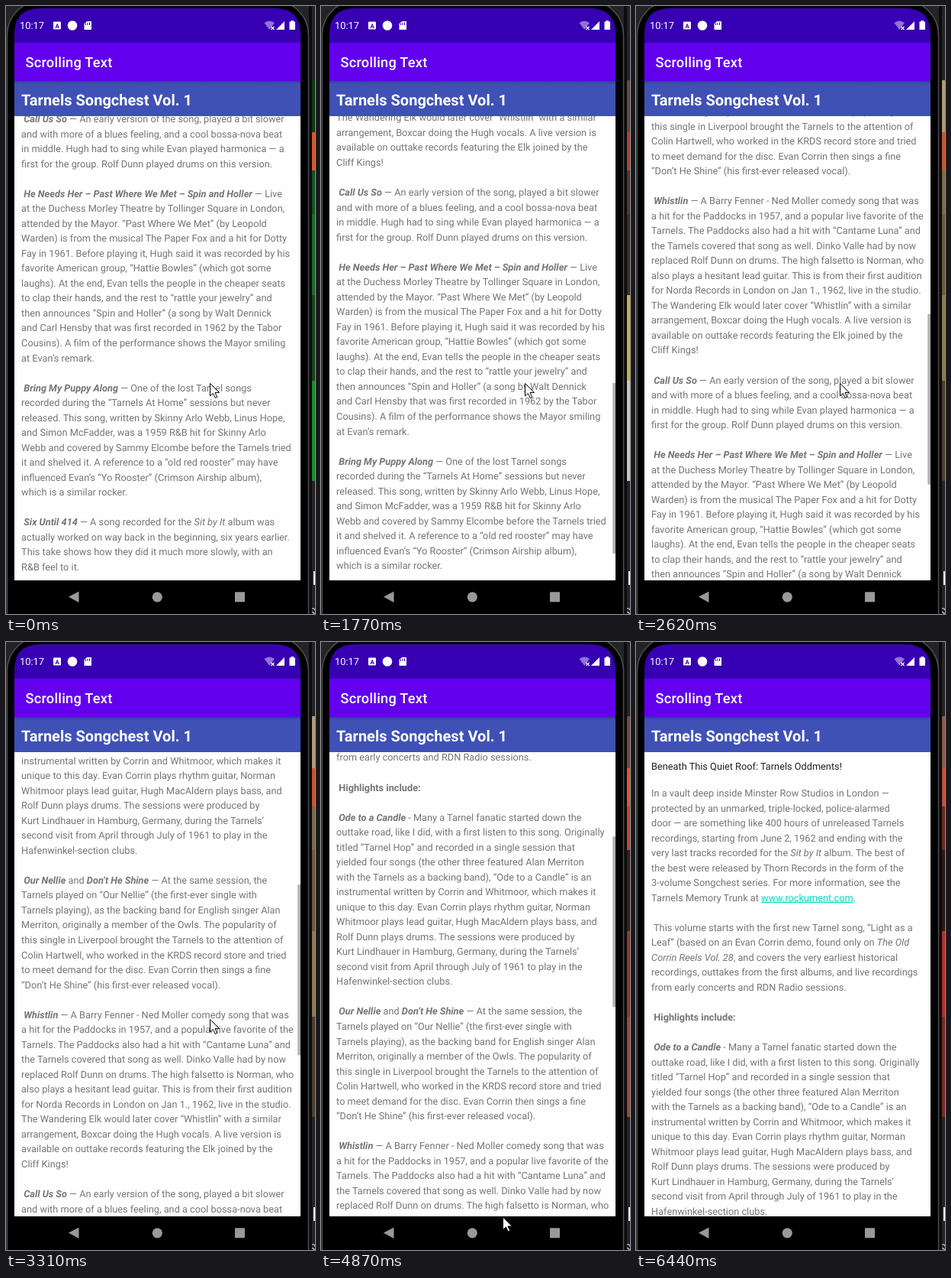
Animation, 405 px wide and 795 px high, one loop 6540 ms. Source, as an HTML page:

```html
<!DOCTYPE html>
<html lang="en">
<head>
<meta charset="utf-8">
<title>Scrolling Text</title>
<style>
html, body { margin: 0; width: 100%; height: 100%; overflow: hidden; background: #242426; }
svg { display: block; width: 405px; height: 795px; }
text { font-family: Roboto, "Noto Sans", sans-serif; white-space: pre; text-rendering: geometricPrecision; }
.body { font-size: 12.76px; fill: #757575; }
.bi { font-weight: 700; font-style: italic; }
.b { font-weight: 700; }
.i { font-style: italic; }
.link { fill: #03dac5; text-decoration: underline; }
</style>
</head>
<body>
<svg viewBox="0 0 405 795">
  <defs>
    <clipPath id="page"><rect x="11" y="144" width="375" height="607"/></clipPath>
    <clipPath id="screen"><path d="M11 795V37Q11 3 45 3H352Q386 3 386 37V795Z"/></clipPath>
    <linearGradient id="shade" x2="0" y2="1">
      <stop stop-opacity=".22"/><stop offset="1" stop-opacity="0"/>
    </linearGradient>
  </defs>

  <rect width="405" height="795" fill="#242426"/>
  <g id="strip"></g>
  <rect x="403" y="739" width="2" height="18" fill="#fff"/>
  <text x="397" y="798" font-size="15" font-style="italic" fill="#ccc">S</text>
  <rect x="397" y="-10" width="4" height="820" fill="#0c0c0d"/>
  <rect x="1.500" y="-7" width="395" height="850" rx="45" fill="#000" stroke="#4c4c4e" stroke-width="1.500"/>

  <g clip-path="url(#screen)">
    <rect x="11" y="3" width="375" height="45" fill="#3700b3"/>
    <rect x="11" y="48" width="375" height="50" fill="#6200ee"/>
    <rect x="11" y="98" width="375" height="46" fill="#3f51b5"/>
    <rect x="11" y="98" width="375" height="4" fill="url(#shade)"/>
    <rect x="11" y="144" width="375" height="607" fill="#fefefe"/>
  </g>

  <g fill="#fff">
    <text x="18" y="30" font-size="12.8">10:17</text>
    <rect x="62" y="20.500" width="10" height="10" rx="1"/>
    <text x="64.400" y="28.500" font-size="8" font-weight="700" style="fill:#3700b3">A</text>
    <circle cx="87" cy="25.500" r="6.300"/>
    <path d="M106 20h6v11h-9.500v-7.500Z"/>
    <path d="M104.500 22.500v2.500M107 21.500v3.500M109.500 21.500v3.500" stroke="#3700b3" stroke-width="1"/>
    <path d="M338.500 22Q345 17 352 22L345.300 31Z" opacity=".45"/>
    <path d="M347.500 27l4 4m0-4l-4 4" stroke="#fff" stroke-width="1.200"/>
    <path d="M354 31L365 20V31Z"/>
    <path d="M371.500 20.500h2v-1.500h3.500v1.500h2V31h-7.500Z"/>
    <text x="25.500" y="80" font-size="18.230" font-weight="500" letter-spacing=".23">Scrolling Text</text>
    <text x="20.100" y="129.500" font-size="20.050" font-weight="700">Tarnels Songchest Vol. 1</text>
  </g>

  <g clip-path="url(#page)">
    <g id="story"></g>
    <ellipse id="lowGlow" cx="198.500" cy="751" rx="215" fill="#6200ee"/>
    <ellipse id="topGlow" cx="198.500" cy="144" rx="215" fill="#6200ee"/>
    <rect id="thumb" x="382.300" width="3.700" height="223" fill="#000"/>
  </g>

  <g fill="#999">
    <path d="M82 772.500L95.500 765.500V780Z"/>
    <circle cx="198.300" cy="772.800" r="6.600"/>
    <rect x="300" y="766.300" width="13" height="13" rx=".8"/>
  </g>
  <path id="cursor" d="M0 0V16.500L3.900 13L6.700 19L9.200 17.900L6.500 12H12Z" fill="#fff" stroke="#000"/>
</svg>

<script>
const LOOP = 6540, LINE = 19.53, TOP = 144, VIEW = 607, MAX = 1046;
const $ = id => document.getElementById(id);

// *bold italic*  _italic_  ^bold^  [link]
const story = `In a vault deep inside Minster Row Studios in London —
protected by an unmarked, triple-locked, police-alarmed
door — are something like 400 hours of unreleased Tarnels
recordings, starting from June 2, 1962 and ending with the
very last tracks recorded for the _Sit by It_ album. The best of
the best were released by Thorn Records in the form of the
3-volume Songchest series. For more information, see the
Tarnels Memory Trunk at [www.rockument.com].

 This volume starts with the first new Tarnel song, “Light as a
Leaf” (based on an Evan Corrin demo, found only on _The Old_
_Corrin Reels Vol. 28_, and covers the very earliest historical
recordings, outtakes from the first albums, and live recordings
from early concerts and RDN Radio sessions.

 ^Highlights include:^

 *Ode to a Candle* - Many a Tarnel fanatic started down the
outtake road, like I did, with a first listen to this song. Originally
titled “Tarnel Hop” and recorded in a single session that
yielded four songs (the other three featured Alan Merriton
with the Tarnels as a backing band), “Ode to a Candle” is an
instrumental written by Corrin and Whitmoor, which makes it
unique to this day. Evan Corrin plays rhythm guitar, Norman
Whitmoor plays lead guitar, Hugh MacAldern plays bass, and
Rolf Dunn plays drums. The sessions were produced by
Kurt Lindhauer in Hamburg, Germany, during the Tarnels’
second visit from April through July of 1961 to play in the
Hafenwinkel-section clubs.

 *Our Nellie* and *Don’t He Shine* — At the same session, the
Tarnels played on “Our Nellie” (the first-ever single with
Tarnels playing), as the backing band for English singer Alan
Merriton, originally a member of the Owls. The popularity of
this single in Liverpool brought the Tarnels to the attention of
Colin Hartwell, who worked in the KRDS record store and tried
to meet demand for the disc. Evan Corrin then sings a fine
“Don’t He Shine” (his first-ever released vocal).

 *Whistlin* — A Barry Fenner - Ned Moller comedy song that was
a hit for the Paddocks in 1957, and a popular live favorite of the
Tarnels. The Paddocks also had a hit with “Cantame Luna” and
the Tarnels covered that song as well. Dinko Valle had by now
replaced Rolf Dunn on drums. The high falsetto is Norman, who
also plays a hesitant lead guitar. This is from their first audition
for Norda Records in London on Jan 1., 1962, live in the studio.
The Wandering Elk would later cover “Whistlin” with a similar
arrangement, Boxcar doing the Hugh vocals. A live version is
available on outtake records featuring the Elk joined by the
Cliff Kings!

 *Call Us So* — An early version of the song, played a bit slower
and with more of a blues feeling, and a cool bossa-nova beat
in middle. Hugh had to sing while Evan played harmonica — a
first for the group. Rolf Dunn played drums on this version.

 *He Needs Her – Past Where We Met – Spin and Holler* — Live
at the Duchess Morley Theatre by Tollinger Square in London,
attended by the Mayor. “Past Where We Met” (by Leopold
Warden) is from the musical The Paper Fox and a hit for Dotty
Fay in 1961. Before playing it, Hugh said it was recorded by his
favorite American group, “Hattie Bowles” (which got some
laughs). At the end, Evan tells the people in the cheaper seats
to clap their hands, and the rest to “rattle your jewelry” and
then announces “Spin and Holler” (a song by Walt Dennick
and Carl Hensby that was first recorded in 1962 by the Tabor
Cousins). A film of the performance shows the Mayor smiling
at Evan’s remark.

 *Bring My Puppy Along* — One of the lost Tarnel songs
recorded during the “Tarnels At Home” sessions but never
released. This song, written by Skinny Arlo Webb, Linus Hope,
and Simon McFadder, was a 1959 R&amp;B hit for Skinny Arlo
Webb and covered by Sammy Elcombe before the Tarnels tried
it and shelved it. A reference to a “old red rooster” may have
influenced Evan’s “Yo Rooster” (Crimson Airship album),
which is a similar rocker.

 *Six Until 414* — A song recorded for the _Sit by It_ album was
actually worked on way back in the beginning, six years earlier.
This take shows how they did it much more slowly, with an
R&amp;B feel to it.`;

const span = (cls, s) => `<tspan class="${cls}">${s}</tspan>`;
const markup = s => s
  .replace(/\*(.+?)\*/g, (_, x) => span('bi', x))
  .replace(/_(.+?)_/g, (_, x) => span('i', x))
  .replace(/\^(.+?)\^/g, (_, x) => span('b', x))
  .replace(/\[(.+?)\]/g, (_, x) => span('link', x));

$('story').innerHTML =
  '<text x="20.1" y="166.500" class="body" style="fill:#212121">Beneath This Quiet Roof: Tarnels Oddments!</text>' +
  story.split('\n').map((s, i) =>
    `<text x="20.1" y="${202 + i * LINE}" class="body">${markup(s)}</text>`).join('');

const ticks = [0, 120, 270, 390, 510, 630, 770, 890, 1010, 1130, 1260, 1380, 1520, 1640, 1770,
  1920, 2040, 2190, 2340, 2470, 2620, 2770, 2890, 3010, 3160, 3310, 3460, 3620, 3740, 3890, 4020,
  4160, 4310, 4430, 4580, 4730, 4870, 5000, 5120, 5270, 5390, 5540, 5660, 5780, 5900, 6050, 6200,
  6320, 6440];

// [time, value] keys, linear between
const scroll = [[1380, MAX], [1520, 1024], [1770, 950], [1920, 926], [2040, 918], [2190, 918],
  [2340, 872], [2620, 704.5], [2770, 622], [2890, 566], [3010, 522], [3160, 486], [3310, 472],
  [4160, 472], [4310, 431], [4430, 392], [4580, 356], [4730, 344], [4870, 300.4], [5000, 190],
  [5120, 86], [5270, 18], [5390, 0]];
const bar = [[630, 0], [770, .3], [3460, .3], [4020, 0], [4160, 0], [4310, .3], [5660, .3], [5900, 0]];
const lowGlow = [[630, 0], [890, 1], [1380, 1], [1770, 0]];
const topGlow = [[5120, 0], [5390, 1.2], [5540, .8], [5900, 0]];

function at(keys, t) {
  const n = keys.findIndex(k => k[0] > t);
  if (n < 0) return keys[keys.length - 1][1];
  if (n === 0) return keys[0][1];
  const [t0, a] = keys[n - 1], [t1, b] = keys[n];
  return a + (b - a) * (t - t0) / (t1 - t0);
}

// sliver of a video behind the phone
const bands = [97, 165, 215, 272, 378, 490, 621];
const scenes = [
  [0, '#0c3a14 #d8562e #14531f #1b6a28 #14451c #1d8a2c'],
  [1130, '#6b4a3a #b5402e #57372c #3a2f22 #c9b24a #c9c6bd'],
  [2190, '#b09a7a #c8552f #7a6a4c #6b5a3c #8a7a52 #4a3f2c'],
  [3460, '#7a4a38 #e0582f #c04a2c #3a1f1a #8f3a2a #a34436'],
  [5270, '#3a2a24 #c25a48 #8a2f25 #241a18 #a8775a #4c3a30'],
  [6050, '#8a5a48 #c0503e #6a2a22 #2a1a16 #b02f2a #7a2a24']
].map(([t, c]) => [t, c.split(' ')]);

$('strip').innerHTML = bands.slice(1).map((y, i) =>
  `<rect x="401" width="4" y="${bands[i]}" height="${y - bands[i]}"/>`).join('');
const cells = [...$('strip').children];

const last = (list, test) => list.filter(test).pop();
const set = (id, attrs) => {
  for (const k in attrs) $(id).setAttribute(k, attrs[k]);
};
const glow = (id, v) => set(id, { ry: 4 + 10 * v, opacity: .06 * Math.min(v, 1) });

function draw(time) {
  const t = last(ticks, x => x <= time);
  const s = at(scroll, t);
  set('story', { transform: `translate(0 ${-s})` });
  set('thumb', { y: TOP + s * VIEW / (VIEW + MAX), opacity: at(bar, t) });
  glow('lowGlow', at(lowGlow, t));
  glow('topGlow', at(topGlow, t));
  set('cursor', {
    transform: t < 4870 ? 'translate(267.5 493.500)' : 'translate(238.5 752)',
    visibility: t < 5000 ? 'visible' : 'hidden'
  });
  const colors = last(scenes, x => x[0] <= t)[1];
  cells.forEach((c, i) => c.setAttribute('fill', colors[i]));
}

const start = performance.now();
function loop() {
  draw((performance.now() - start) % LOOP);
  requestAnimationFrame(loop);
}
loop();
</script>
</body>
</html>
```
